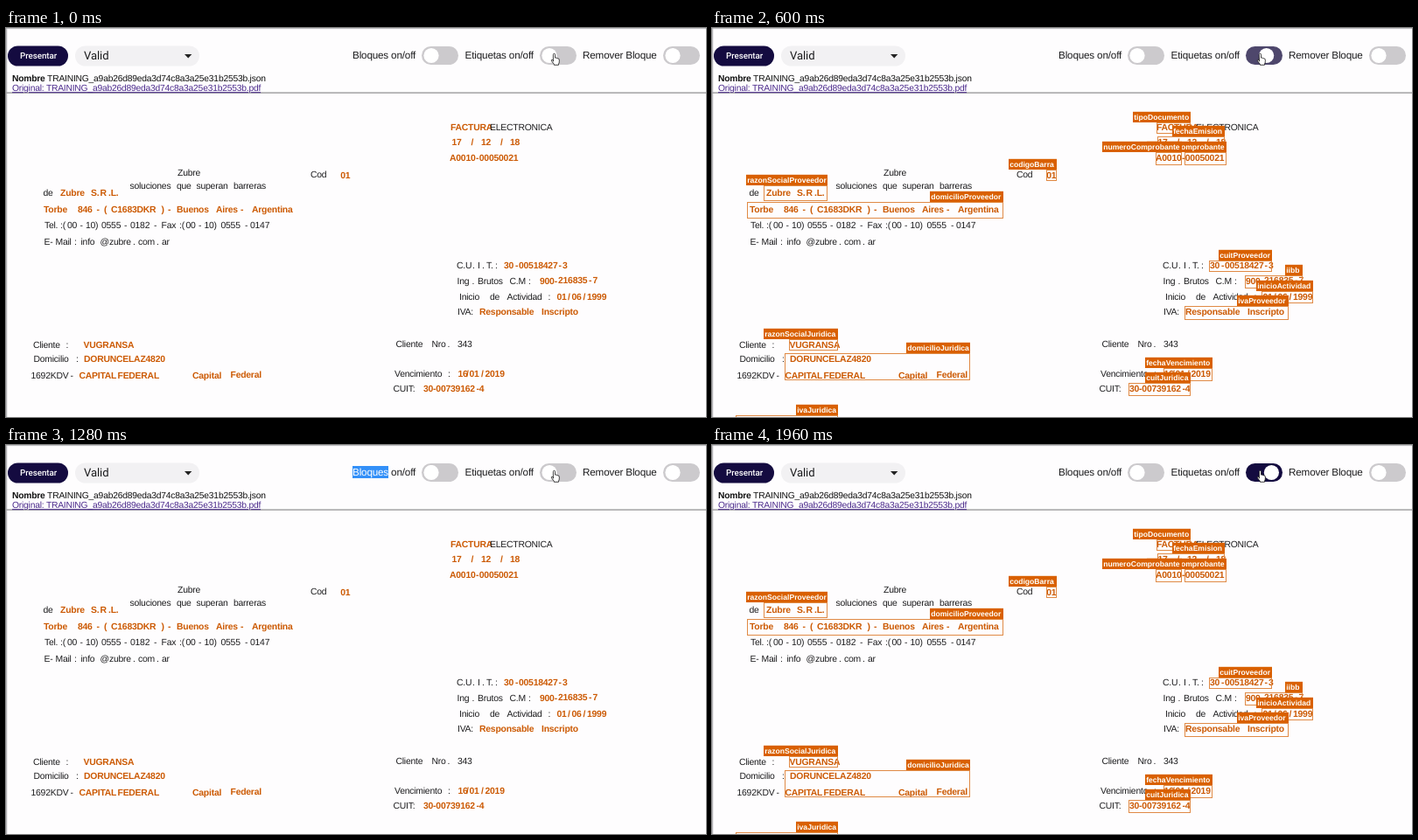
These frames come from a looping animation (800x445 px, 2 s). An HTML page:

```html
<!DOCTYPE html>
<html lang="es">
<head>
<meta charset="utf-8">
<title>Etiquetas</title>
<style>
  html, body { margin: 0; width: 100%; height: 100%; overflow: hidden; background: #fefdfe; }
  svg { display: block; width: 100vw; height: 100vh; }
  text { font-family: "Liberation Sans", Arial, sans-serif; font-size: 10.4px; letter-spacing: -.22px;
         fill: #1c1c1e; white-space: pre; text-rendering: geometricPrecision; }
  .hot { font-weight: bold; fill: #cc5a04; }
  .tag { font-weight: bold; font-size: 8.6px; letter-spacing: 0; fill: #fff; }
  .ui { font-size: 11.7px; letter-spacing: -.17px; }
  .file { font-size: 10.3px; letter-spacing: -.213px; fill: #111; }
  .link { font-size: 10.3px; letter-spacing: -.213px; fill: #4b2a8c; text-decoration: underline; }
  .button { font: 500 9.8px Roboto, sans-serif; letter-spacing: -.05px; fill: #fff; }
  .select { font: 13.1px Roboto, sans-serif; letter-spacing: -.1px; }
</style>
</head>
<body>
<svg viewBox="0 0 800 445" preserveAspectRatio="none">
  <defs>
    <linearGradient id="edge">
      <stop offset="0" stop-color="#8c8c90"/>
      <stop offset="1" stop-color="#fefdfe" stop-opacity="0"/>
    </linearGradient>
    <linearGradient id="top" href="#edge" x2="0" y2="1"/>
  </defs>
  <rect width="800" height="445" fill="#fefdfe"/>
  <g id="page"></g>
  <g id="tags"></g>
  <rect width="2.5" height="445" fill="url(#edge)"/>
  <rect width="800" height="2" fill="url(#top)"/>
  <rect y="73.4" width="800" height="1.5" fill="#a3a2a5"/>
  <g id="bar">
    <rect x="2" y="20.5" width="69" height="23" rx="11.5" fill="#140b40"/>
    <text class="button" x="16" y="35.3">Presentar</text>
    <rect x="79" y="20.5" width="142" height="23" rx="11.5" fill="#f2f1f3"/>
    <text class="select" x="89" y="36.3">Valid</text>
    <path d="M204 30h8.4l-4.2 4.6z" fill="#222"/>
    <rect id="mark" x="396" y="24" width="41" height="14" fill="#3390f8"/>
    <text class="ui" x="396" y="35.2"><tspan id="picked">Bloques</tspan> on/off</text>
    <text class="ui" x="524.6" y="35.2">Etiquetas on/off</text>
    <text class="ui" x="659" y="35.2">Remover Bloque</text>
    <text class="file" x="7" y="60.5"><tspan font-weight="bold">Nombre</tspan> TRAINING_a9ab26d89eda3d74c8a3a25e31b2553b.json</text>
    <text class="link" x="7" y="72.2">Original: TRAINING_a9ab26d89eda3d74c8a3a25e31b2553b.pdf</text>
  </g>
  <g id="switches"></g>
  <path d="M625.4 38.2V30.6q0-1.3 1.1-1.3t1.1 1.3v3.6q1.1-.6 1.7.4 1.1-.4 1.6.5 1.4-.3 1.4 1.2v2.4q0 1.5-.8 2.4v1.2h-5.2v-1l-2.7-3.4q-.8-1.3.2-1.7.7-.2 1.6 1.1z"
        fill="#fff" stroke="#111" stroke-width=".8" stroke-linejoin="round"/>
</svg>
<script>
const LOOP = 2000, EASE_MS = 400;
const ORANGE = '#d96000';
const OFF = [204, 202, 205], ON = [20, 11, 64];
const $ = id => document.getElementById(id);

function add(parent, name, attrs, content) {
  const el = document.createElementNS('http://www.w3.org/2000/svg', name);
  for (const key in attrs) el.setAttribute(key, attrs[key]);
  if (content) el.textContent = content;
  return parent.appendChild(el);
}

// Words of one line: x, text, x, text, ...
function line(cls, y, ...words) {
  for (let i = 0; i < words.length; i += 2)
    add($('page'), 'text', { class: cls, x: words[i], y }, words[i + 1]);
}
const plain = (...args) => line('', ...args);
const hot = (...args) => line('hot', ...args);

// A framed field whose label sits on its top right corner.
function field(name, labelLeft, left, right, top, bottom) {
  const g = $('tags');
  add(g, 'rect', { x: left + .5, y: top + .5, width: right - left - 1, height: bottom - top - 1,
    fill: 'none', stroke: '#e08a45' });
  add(g, 'rect', { x: labelLeft, y: top - 12.2, width: right - labelLeft, height: 12.2, fill: ORANGE });
  add(g, 'text', { class: 'tag', x: labelLeft + 1.2, y: top - 3 }, name);
}

function toggle(x) {
  const track = add($('switches'), 'rect', { x, y: 21, width: 42, height: 21, rx: 10.5, fill: `rgb(${OFF})` });
  const knob = add($('switches'), 'circle', { cx: x + 11, cy: 31.5, r: 8.6, fill: '#fff' });
  return k => {
    track.setAttribute('fill', `rgb(${OFF.map((c, i) => Math.round(c + (ON[i] - c) * k))})`);
    knob.setAttribute('cx', x + 11 + 18.4 * k);
  };
}

hot(117, 508, 'FACTURA');
plain(117, 553, 'ELECTRONICA');
hot(133.5, 509.5, '17', 531.5, '/', 543, '12', 565, '/', 576, '18');
hot(152, 507, 'A0010', 537, '-', 540.8, '00050021');
plain(169, 196, 'Zubre');
plain(170.5, 348, 'Cod');
hot(172, 382.3, '01');
plain(184, 141.5, 'soluciones', 195, 'que', 217.5, 'superan', 260, 'barreras');
plain(191.5, 42.5, 'de');
hot(191.5, 62, 'Zubre', 97, 'S.', 107.5, 'R', 117, '.L.');

hot(211, 43, 'Torbe', 82, '846', 103.5, '-', 112, '(', 120, 'C1683DKR', 177.5, ')', 185, '-',
  195, 'Buenos', 240, 'Aires', 268, '-', 281, 'Argentina');
plain(229, 44, 'Tel.', 62, ':(', 70, '00', 84.5, '-', 91, '10)', 109, '0555', 135, '-', 142, '0182',
  169, '-', 177.5, 'Fax', 198, ':(', 205.5, '00', 220, '-', 226.5, '10)', 245.5, '0555', 273, '-', 279, '0147');
plain(248, 43.5, 'E-', 56.5, 'Mail', 78, ':', 85.5, 'info', 107.5, '@', 118, 'zubre', 145, '.', 151, 'com', 172, '.', 178, 'ar');

plain(275, 515, 'C.U', 533, '.', 539, 'I', 544, '.', 549, 'T.', 559, ':');
hot(275, 569, '30', 582, '-', 586, '00518427', 631.5, '-', 636, '3');
plain(293, 515.5, 'Ing', 532.5, '.', 539, 'Brutos', 575.5, 'C.M', 597, ':');
hot(293, 610, '900-');
hot(292, 631, '216835', 666, '-', 670.5, '7');
plain(311, 518, 'Inicio', 553, 'de', 572.5, 'Actividad', 619.5, ':');
hot(310.5, 629.5, '01', 642, '/', 646.5, '06', 659.5, '/', 664, '1999');
plain(327.5, 516, 'IVA:');
hot(327.5, 541, 'Responsable', 612, 'Inscripto');

plain(365.5, 31, 'Cliente', 68.5, ':');
hot(365.5, 88.5, 'VUGRANSA');
plain(382, 31.5, 'Domicilio', 80, ':');
hot(382, 89, 'DORUNCELAZ4820');
plain(400.5, 28.5, '1692KDV', 73.5, '-');
hot(400.5, 83.5, 'CAPITAL', 127.5, 'FEDERAL', 213, 'Capital');
hot(399.5, 256.5, 'Federal');

plain(365, 445.5, 'Cliente', 486.5, 'Nro', 504.5, '.', 516, '343');
plain(399, 444, 'Vencimiento', 505, ':');
hot(399, 516.5, '16', 526, '/', 529.5, '01', 543, '/', 547.5, '2019');
plain(416, 442.5, 'CUIT:');
hot(416, 477, '30-00739162', 537.5, '-4');

field('tipoDocumento', 481, 508, 547, 108, 121);
field('fechaEmision', 526, 509, 586, 124, 137);
field('numeroComprobante', 497, 540, 588, 142, 157);
field('numeroComprobante', 446, 507, 537, 142, 157);
field('codigoBarra', 339, 382, 394, 162, 175);
field('razonSocialProveedor', 39, 59, 132, 180, 198);
field('domicilioProveedor', 249, 40, 333, 199, 218);
field('cuitProveedor', 579, 568, 640, 266, 279);
field('iibb', 655, 609, 675, 283, 298);
field('inicioActividad', 622, 628, 687, 301, 315);
field('ivaProveedor', 600, 540, 659, 318, 334);
field('razonSocialJuridica', 59, 88, 144, 356, 369);
field('domicilioJuridica', 222, 83, 295, 372, 403);
field('ivaJuridica', 96, 27, 144, 443, 460);
field('fechaVencimiento', 495, 516, 572, 389, 404);
field('cuitJuridica', 495, 476, 547, 406, 421);

toggle(475);
const setLabels = toggle(610);
toggle(751);

// The standard CSS "ease" curve.
function ease(x) {
  if (x <= 0) return 0;
  if (x >= 1) return 1;
  const curve = (a, b, s) => 3 * a * s * (1 - s) ** 2 + 3 * b * s * s * (1 - s) + s ** 3;
  let lo = 0, hi = 1;
  for (let i = 0; i < 24; i++) {
    const mid = (lo + hi) / 2;
    if (curve(.25, .25, mid) < x) lo = mid; else hi = mid;
  }
  return curve(.1, 1, lo);
}

function draw(t) {
  const shown = (t >= 440 && t < 920) || t >= 1480;
  const selected = t >= 800 && t < 1400;
  const slide = start => ease((t - start) / EASE_MS);
  $('tags').style.display = shown ? '' : 'none';
  $('mark').style.display = selected ? '' : 'none';
  $('picked').style.fill = selected ? '#fff' : '';
  setLabels(slide(440) - slide(920) + slide(1480));
}

function tick() {
  draw(performance.now() % LOOP);
  requestAnimationFrame(tick);
}
tick();
</script>
</body>
</html>
```
